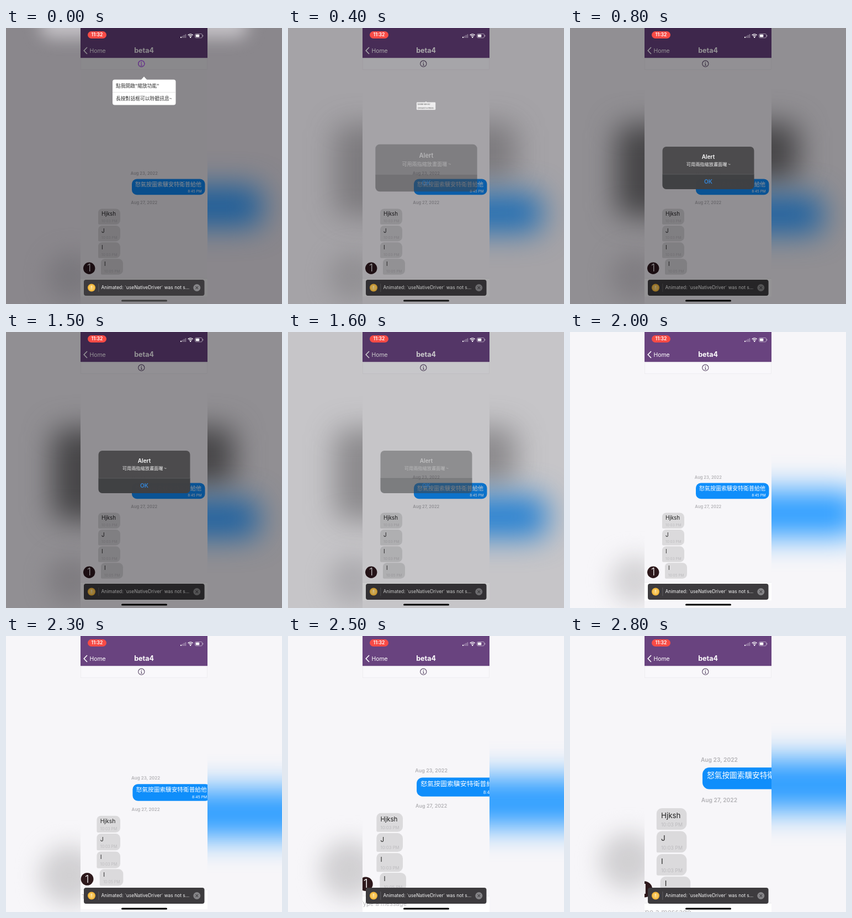
Animation, 500 px wide and 500 px high, one loop 2900 ms. Source, as an HTML page with a canvas:

```html
<!DOCTYPE html>
<html lang="zh-Hant">
<head>
<meta charset="utf-8">
<style>
html, body { margin: 0; width: 100%; height: 100%; overflow: hidden; background: #f7f6f9; }
canvas { display: block; width: 500px; height: 500px; }
</style>
</head>
<body>
<canvas id="stage" width="500" height="500"></canvas>
<script>
const ctx = document.getElementById('stage').getContext('2d');
const LOOP = 2900, STEP = 100, TIP_DIM = 0.45, ALERT_DIM = 0.42;
const LATIN = 'Inter, "Noto Sans CJK TC", sans-serif';
const CJK = '"Noto Sans CJK TC", "Noto Sans CJK", sans-serif';
const PAPER = [247, 246, 249], SHADE = [4, 0, 6];

const lerp = (a, b, k) => a + (b - a) * k;
const mix = (a, b, k) => `rgb(${a.map((v, i) => Math.round(lerp(v, b[i], k)))})`;
const shaded = (color, dim) => mix(color, SHADE, dim);

// Each track is a list of [time, value] pairs joined by straight lines.
function track(t, keys) {
  if (t <= keys[0][0]) return keys[0][1];
  for (let i = 1; i < keys.length; i++) {
    const [t0, v0] = keys[i - 1], [t1, v1] = keys[i];
    if (t <= t1) return lerp(v0, v1, (t - t0) / (t1 - t0));
  }
  return keys[keys.length - 1][1];
}

function rect(x, y, w, h, fill, radius = 0) {
  ctx.beginPath();
  ctx.roundRect(x, y, w, h, radius);
  ctx.fillStyle = fill;
  ctx.fill();
}

function disc(x, y, r, fill) {
  ctx.beginPath();
  ctx.arc(x, y, r, 0, Math.PI * 2);
  ctx.fillStyle = fill;
  ctx.fill();
}

function line(color, width, ...points) {
  ctx.beginPath();
  points.forEach(([x, y]) => ctx.lineTo(x, y));
  ctx.strokeStyle = color;
  ctx.lineWidth = width;
  ctx.stroke();
}

function text(str, x, y, size, color, { weight = 400, align = 'left', family = LATIN } = {}) {
  ctx.font = `${weight} ${size}px ${family}`;
  ctx.textAlign = align;
  ctx.textBaseline = 'middle';
  ctx.fillStyle = color;
  ctx.fillText(str, x, y);
}

function layer(draw) {
  ctx.save();
  draw();
  ctx.restore();
}

function clip(x, y, w, h) {
  ctx.beginPath();
  ctx.rect(x, y, w, h);
  ctx.clip();
}

function scaleAround(s, x, y) {
  ctx.translate(x, y);
  ctx.scale(s, s);
  ctx.translate(-x, -y);
}

function stateAt(t) {
  const tipDim = track(t, [[0, TIP_DIM], [100, TIP_DIM], [300, 0.25], [400, 0.15], [500, 0.04], [600, 0]]);
  const alertDim = track(t, [[200, 0], [400, 0.22], [600, ALERT_DIM], [1500, ALERT_DIM], [1600, 0.2], [1700, 0.05], [1800, 0]]);
  return {
    t, tipDim, alertDim,
    dim: 1 - (1 - tipDim) * (1 - alertDim),
    alert: track(t, [[200, 0], [300, 0.15], [400, 0.42], [500, 0.85], [600, 0.98], [1500, 0.98], [1600, 0.45], [1700, 0.14], [1800, 0]]),
    alertScale: track(t, [[300, 1.16], [400, 1.11], [500, 1.03], [600, 1]]),
    tip: track(t, [[0, 1], [100, 0.97], [200, 0.82], [300, 0.58], [400, 0.3], [500, 0]]),
    zoom: track(t, [[2100, 1], [2200, 1.025], [2300, 1.065], [2400, 1.125], [2600, 1.26], [2700, 1.32], [2800, 1.364]]),
  };
}

function drawSides(s) {
  const { t, dim } = s;
  rect(0, 0, 500, 500, shaded(PAPER, dim));

  layer(() => {
    ctx.filter = 'blur(15px)';
    ctx.globalAlpha = track(t, [[0, 0.7], [300, 0]]);
    rect(62, -30, 376, 48, '#dedce0', 20);
  });

  layer(() => {
    ctx.filter = 'blur(26px)';
    ctx.globalAlpha = s.alert;
    rect(84, 175, 130, 166, '#454446', 20);
    rect(290, 172, 124, 104, '#454446', 20);
  });

  layer(() => {
    ctx.filter = 'blur(27px)';
    const mid = track(t, [[0, 323], [500, 338], [1500, 338], [1700, 331], [2100, 328], [2300, 321], [2800, 269]]);
    const half = track(t, [[0, 36], [500, 34], [1500, 34], [1700, 40], [2300, 43], [2800, 46]]);
    const end = track(t, [[0, 464], [600, 458], [1500, 458], [1700, 480], [2300, 570]]);
    rect(270, mid - half, end - 270, half * 2, shaded([40, 155, 255], dim * 0.9), 20);
  });

  layer(() => {
    ctx.filter = 'blur(20px)';
    const x = track(t, [[2100, 118], [2800, 106]]);
    const y = track(t, [[2100, 450], [2300, 434], [2800, 408]]);
    const r = track(t, [[2100, 44], [2300, 54], [2800, 52]]);
    ctx.globalAlpha = track(t, [[0, 0.6], [1700, 0.7], [2300, 0.85]]);
    disc(x, y, r, shaded([202, 201, 204], dim));
  });
}

function applyZoom({ zoom }) {
  const k = (zoom - 1) / 0.364;
  scaleAround(zoom, lerp(209, 195, k), lerp(353, 370, k));
}

function greyBubble(x, y, label, time) {
  rect(x, y, 40, 28.5, '#dbdadc', [7, 8, 8, 2]);
  text(label, x + 6, y + 10, 9.8, '#222');
  text(time, x + 6, y + 22.5, 6.5, '#bdbcbf');
}

function drawChat(s) {
  layer(() => {
    clip(135, 76, 230, 424);
    applyZoom(s);
    const date = { weight: 600, align: 'center' };
    text('Aug 23, 2022', 250.3, 263.7, 7.5, '#b3b2b6', date);
    text('Aug 27, 2022', 250.3, 317, 7.5, '#b3b2b6', date);
    ['Hjksh', 'J', 'I'].forEach((label, i) => greyBubble(167, 327.5 + i * 30.4, label, '10:03 PM'));
    greyBubble(172, 418.2, 'I', '10:05 PM');
    disc(150.7, 435.2, 10.7, '#2d181b');
    text('1', 150.5, 435.7, 18, '#fff', { weight: 300, align: 'center' });
    rect(100, 453.5, 300, 33, '#fff');
    line('#e5e4e7', 0.6, [100, 453.5], [400, 453.5]);
    text('Type a message', 141, 465.5, 9.3, '#b5b4b8');

    rect(228, 273.5, 132.5, 28.7, '#0f8efb', 9);
    text('怒氣按圖索驥安特衛普給他', 234, 283, 10, '#fff', { family: CJK });
    text('8:45 PM', 354.5, 296, 6.4, '#fff', { align: 'right' });
  });
}

function drawInfoIcon(color) {
  ctx.beginPath();
  ctx.arc(245.3, 64.7, 5.6, 0, Math.PI * 2);
  ctx.strokeStyle = color;
  ctx.lineWidth = 1.1;
  ctx.stroke();
  disc(245.3, 62.2, 0.8, color);
  line(color, 1, [244.2, 64.4], [245.5, 64.4], [245.5, 67.6]);
  line(color, 0.8, [243.8, 67.6], [247, 67.6]);
}

function drawHeader() {
  rect(135, 0, 230, 54.5, '#69437f');
  line('#fff', 1.6, [147, 35], [141.2, 41], [147, 47]);
  text('Home', 151.5, 41.5, 10.4, '#fff');
  text('beta4', 250, 41.5, 12.5, '#fff', { weight: 700, align: 'center' });
  rect(135, 54.5, 230, 21, '#f9f8fb');
  ctx.strokeStyle = '#ebe9ed';
  ctx.lineWidth = 0.7;
  ctx.strokeRect(135.4, 54.9, 229.2, 20.4);
  drawInfoIcon('#5a4868');
}

function drawStatusBar() {
  rect(148, 6, 34, 13, '#f84b46', 6.5);
  text('11:32', 165, 12.8, 8.6, '#fff', { weight: 600, align: 'center' });
  for (let i = 0; i < 4; i++) {
    const h = 2.2 + i * 1.5;
    rect(316 + i * 2.8, 18 - h, 1.9, h, i ? 'rgba(255,255,255,.35)' : '#fff', 0.5);
  }
  ctx.lineWidth = 1.4;
  ctx.strokeStyle = '#fff';
  for (const r of [3.6, 6.2]) {
    ctx.beginPath();
    ctx.arc(334.2, 17.3, r, -Math.PI * 0.76, -Math.PI * 0.24);
    ctx.stroke();
  }
  disc(334.2, 16.7, 1.3, '#fff');
  ctx.beginPath();
  ctx.roundRect(342.5, 10.5, 13, 7.4, 2);
  ctx.strokeStyle = 'rgba(255,255,255,.6)';
  ctx.lineWidth = 0.8;
  ctx.stroke();
  rect(343.8, 11.8, 6.5, 4.8, '#fff', 1);
  rect(356.3, 12.8, 1, 2.8, 'rgba(255,255,255,.6)');
}

function drawToast(s) {
  rect(141, 456, 218.5, 29, '#3d3b3e', 4);
  disc(155, 470.5, 7, '#f3b73c');
  disc(155, 470.5, 4.8, '#f8c95f');
  text('!', 155, 470.7, 7.5, '#fff', { weight: 600, align: 'center' });
  line('#68676a', 0.8, [167.8, 463], [167.8, 478]);
  text('Animated: `useNativeDriver` was not s...', 172.5, 470.8, 8.45, '#f4f4f4');
  disc(345.8, 470.5, 6.5, '#858487');
  line('#444346', 1.1, [343.5, 468.2], [348.1, 472.8]);
  line('#444346', 1.1, [348.1, 468.2], [343.5, 472.8]);
  rect(141, 456, 218.5, 29, `rgba(0,0,0,${s.alertDim * 0.9})`, 4);
  const bar = Math.round(60 * s.tipDim / TIP_DIM);
  rect(209, 492.4, 83, 3, `rgb(${bar},${bar},${bar})`, 1.5);
}

function drawTooltip({ tip }) {
  if (tip <= 0) return;
  layer(() => {
    ctx.globalAlpha = Math.min(1, 0.7 + tip * 0.4);
    ctx.translate(0, (1 - tip) * 36);
    scaleAround(tip, 250, 116);
    ctx.beginPath();
    ctx.moveTo(244.5, 94);
    ctx.lineTo(250, 88);
    ctx.lineTo(255.5, 94);
    ctx.fillStyle = '#fff';
    ctx.fill();
    rect(193, 93.5, 114.5, 46, '#fff', 4);
    line('#dcdcde', 0.8, [193, 116.5], [307.5, 116.5]);
    text('點我開啟"縮放功能"', 199, 105, 8.75, '#303030', { family: CJK });
    text('長按對話框可以聆聽訊息~', 199, 128, 8.8, '#303030', { family: CJK });
  });
}

function drawAlert(s) {
  if (s.alert <= 0) return;
  layer(() => {
    scaleAround(s.alertScale, 250.5, 253.3);
    ctx.globalAlpha = s.alert;
    rect(167.5, 215, 166, 77, '#4b4a4c', 7);
    rect(167.5, 265, 166, 27, 'rgba(48,50,53,.4)', [0, 0, 7, 7]);
    line('#626164', 0.7, [167.5, 265], [333.5, 265]);
    const centre = { align: 'center' };
    text('Alert', 250.5, 233.8, 10, '#fff', { ...centre, weight: 600 });
    text('可用兩指縮放畫面囉 ~', 250.8, 246.8, 8.2, '#f4f4f4', { ...centre, family: CJK });
    text('OK', 250.5, 279, 10.2, '#3488dc', { ...centre, weight: 600 });
  });
}

function draw(t) {
  const s = stateAt(t);
  drawSides(s);
  rect(135, 0, 230, 500, `rgb(${PAPER})`);
  drawChat(s);
  drawHeader();
  rect(135, 0, 230, 500, `rgba(${SHADE},${s.dim})`);
  drawStatusBar();
  if (t < 400) drawInfoIcon('#7436a0');
  drawToast(s);
  drawTooltip(s);
  drawAlert(s);
}

function tick() {
  draw(Math.floor((performance.now() % LOOP) / STEP) * STEP);
  requestAnimationFrame(tick);
}
tick();
</script>
</body>
</html>
```
